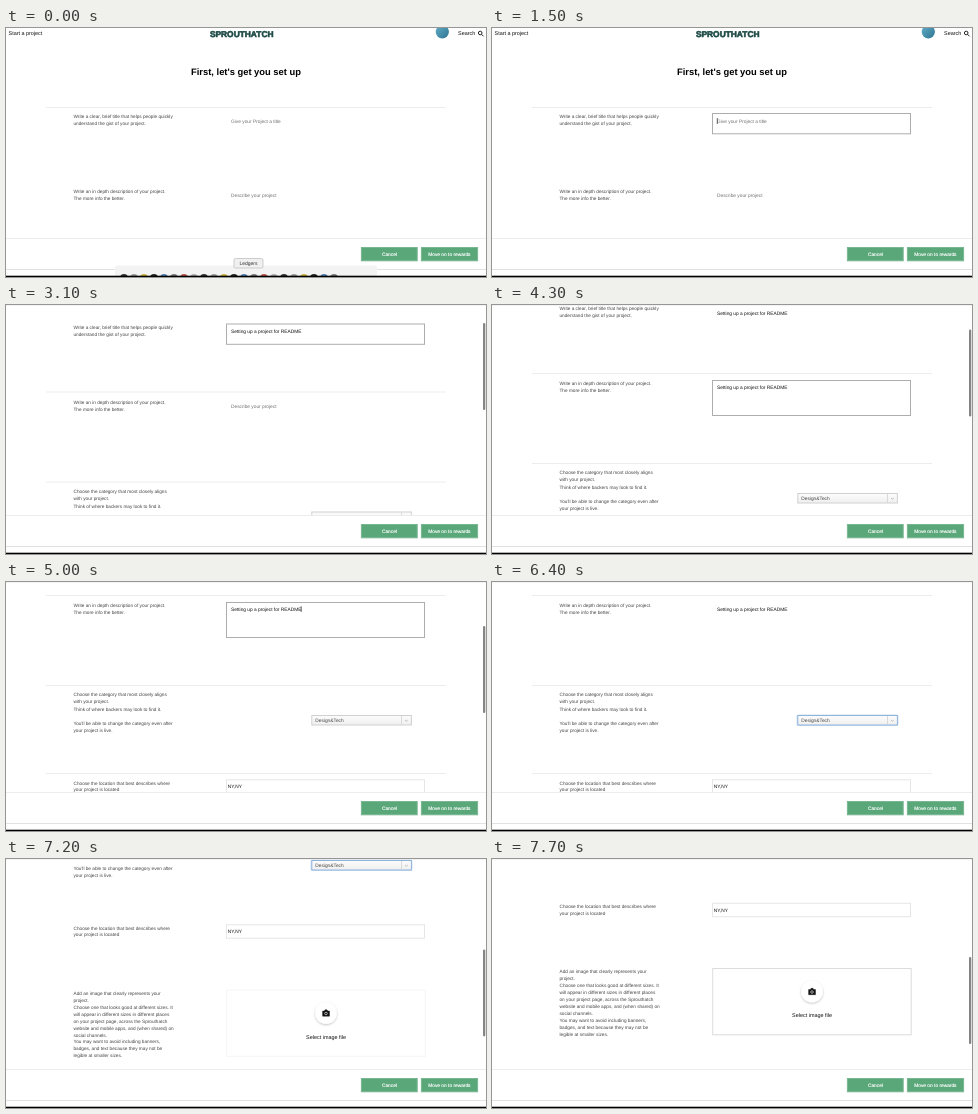
These frames come from a looping animation (480x249 px, 8 s). An HTML page:

```html
<!DOCTYPE html>
<html lang="en">
<head>
<meta charset="utf-8">
<title>Project setup form</title>
<style>
  html, body { margin: 0; width: 100%; height: 100%; overflow: hidden; background: #fff; }
  svg { display: block; width: 480px; height: 249px; }
  text { font-family: "Liberation Sans", Arial, sans-serif; font-size: 4.82px; fill: #111; text-rendering: geometricPrecision; }
  .note { font-size: 4.72px; fill: #444; }
  .hint { fill: #707070; }
  .nav { font-size: 5.45px; }
  .mid { text-anchor: middle; }
  .box { fill: none; stroke: #adadad; }
  .rule { stroke: #ededed; }
  .button rect { fill: #5aa779; stroke: #79b692; }
  .button text { fill: #fff; stroke: #fff; stroke-width: .15; }
</style>
</head>
<body>
<svg viewBox="0 0 480 249">
  <defs>
    <linearGradient id="avatar" x2="1" y2="1">
      <stop stop-color="#62aecb"/><stop offset="1" stop-color="#2f7590"/>
    </linearGradient>
    <linearGradient id="face" x2="0" y2="1">
      <stop stop-color="#fcfcfc"/><stop offset="1" stop-color="#efefef"/>
    </linearGradient>
    <filter id="shadow" x="-50%" y="-50%" width="200%" height="200%">
      <feDropShadow dx="0" dy="1" stdDeviation="1" flood-opacity=".25"/>
    </filter>
  </defs>

  <g id="page">
    <text class="nav" x="2.5" y="7">Start a project</text>
    <text class="mid" x="235.7" y="8.6" style="font-size:8.4px;font-weight:bold;fill:#1d4a46;stroke:#1d4a46;stroke-width:.6;stroke-linejoin:round">SPROUTHATCH</text>
    <circle cx="436.3" cy="3.8" r="6.6" fill="url(#avatar)"/>
    <text class="nav" x="452" y="7">Search</text>
    <g fill="none" stroke="#222"><circle cx="474.2" cy="5" r="1.8"/><path d="M475.5 6.3l2 2"/></g>
    <text class="mid" x="240" y="47.3" style="font-size:9.37px;font-weight:bold;fill:#000">First, let's get you set up</text>

    <g id="rules"></g>
    <g id="notes"></g>

    <rect id="titleBox" class="box" x="220.5" y="85.5" width="198" height="20.3"/>
    <text id="titleText" x="225" y="94.5"></text>
    <path id="titleCaret" d="M225.3 90v6" stroke="#222" stroke-width=".7"/>

    <rect id="aboutBox" class="box" x="220.5" y="160.5" width="198" height="35"/>
    <text id="aboutText" x="225" y="169.2"></text>
    <path id="aboutCaret" d="M295.2 164.3v5.7" stroke="#222" stroke-width=".7"/>

    <rect id="glow" x="305.5" y="273.5" width="100" height="9.5" rx="1" fill="none" stroke="#cfe1f4" stroke-width="2"/>
    <rect id="select" x="305.8" y="273.5" width="99.6" height="9.5" fill="url(#face)"/>
    <path d="M395.5 274v9" stroke="#d2d2d2" stroke-width=".8"/>
    <path d="M399 278l1.4 1.2 1.4-1.2" fill="none" stroke="#999" stroke-width=".6"/>
    <text x="309.3" y="280" fill="#444" style="fill:#444">Design&amp;Tech</text>

    <rect class="box" x="220.5" y="337.8" width="198" height="13.4" style="stroke:#e6e6e6"/>
    <text x="221.8" y="346.4">NY,NY</text>

    <rect id="drop" class="box" x="220.7" y="403" width="198.5" height="66.3"/>
    <circle cx="320" cy="426" r="10.8" fill="#fff" filter="url(#shadow)"/>
    <path d="M316.6 424h1.8l.7-1.2h1.9l.7 1.2h1.8v5.2h-6.9z" fill="#111" stroke="#111" stroke-width=".4" stroke-linejoin="round"/>
    <circle cx="320" cy="426.5" r="1.3" fill="none" stroke="#fff" stroke-width=".6"/>
    <text class="nav mid" x="320" y="451.5">Select image file</text>
  </g>

  <path id="topEdge" d="M0 .3H480" stroke="#e6e6e6" stroke-width=".6"/>
  <rect id="thumb" x="477" width="2.3" height="87" rx="1.1" fill="#858585"/>

  <rect y="210" width="480" height="39" fill="#fff"/>
  <path class="rule" d="M0 210.5H480"/>
  <path d="M0 241.5H480" stroke="#e2e2e2"/>
  <g class="button">
    <rect x="355.4" y="219.5" width="55.8" height="13.3"/>
    <text class="mid" x="383.4" y="227.8">Cancel</text>
    <rect x="415.4" y="219.5" width="56.2" height="13.3"/>
    <text class="mid" x="443.4" y="227.8">Move on to rewards</text>
  </g>

  <g id="dock"><rect x="109" y="237.5" width="262" height="16" rx="2" fill="#f3f3f3"/></g>
  <g id="tip">
    <rect x="228" y="230.5" width="29" height="9.5" rx="1.5" fill="#f0f0f0" stroke="#bbb" stroke-width=".7"/>
    <text class="mid" x="242.5" y="237" style="font-size:5px;fill:#333">Ledgers</text>
  </g>
  <rect y="247.7" width="480" height="1.3" fill="#000"/>
</svg>

<script>
const $ = id => document.getElementById(id);
const LOOP = 8000, TICK = 100;

function add(parent, tag, attrs, text = '') {
  const el = document.createElementNS('http://www.w3.org/2000/svg', tag);
  for (const key in attrs) el.setAttribute(key, attrs[key]);
  el.textContent = text;
  return parent.appendChild(el);
}

// Help text: top line centre, then lines; an empty line leaves a gap
const notes = [
  [88.7, 'Write a clear, brief title that helps people quickly', 'understand the gist of your project.'],
  [163.4, 'Write an in depth description of your project.', 'The more info the better.'],
  [252.6, 'Choose the category that most closely aligns', 'with your project.'],
  [267.5, 'Think of where backers may look to find it.', '',
    "You'll be able to change the category even after", 'your project is live.'],
  [340.8, 'Choose the location that best describes where', 'your project is located'],
  [406, 'Add an image that clearly represents your', 'project.',
    'Choose one that looks good at different sizes. It', 'will appear in different sizes in different places',
    'on your project page, across the Sprouthatch', 'website and mobile apps, and (when shared) on',
    'social channels.', 'You may want to avoid including banners,',
    'badges, and text because they may not be', 'legible at smaller sizes.']
];
for (const [top, ...lines] of notes)
  lines.forEach((line, i) => add($('notes'), 'text', { class: 'note', x: 67.5, y: top + 1.7 + i * 6.97 }, line));

// Section rules: y, shown from, shown until
const rules = [[79.5, 0, 2900], [153.5, 2800, 6600], [243.5, 2800, 6600], [331.5, 4300, 7100], [397.3, 6500, 7100]]
  .map(([y, from, to]) => ({ from, to, el: add($('rules'), 'path', { class: 'rule', d: `M40 ${y}H440` }) }));

const iconColors = ['#333', '#777', '#c9b13c', '#aaa', '#4d7fae', '#999', '#b5564a', '#222'];
for (let i = 0; i < 22; i++)
  add($('dock'), 'circle', { cx: 118 + i * 10, cy: 250, r: 4, fill: iconColors[i * 5 % 8] });

// Linear interpolation through [time, value] pairs
function track(keys, t) {
  const next = keys.findIndex(k => k[0] > t);
  if (next < 0) return keys.at(-1)[1];
  if (!next) return keys[0][1];
  const [t0, a] = keys[next - 1], [t1, b] = keys[next];
  return a + (b - a) * (t - t0) / (t1 - t0);
}

const scrollKeys = [
  [2700, 0], [2800, 6], [2900, 30], [3000, 55], [3100, 66.5], [3400, 67.3],
  [4200, 67.3], [4300, 85], [4400, 115], [4500, 134], [4600, 140],
  [6400, 140], [6500, 165], [6600, 198], [6800, 198], [6900, 203],
  [7000, 222], [7100, 248], [7200, 272], [7300, 286], [7400, 292], [7500, 293.5]
];
const thumbKeys = [[2700, 0], [2800, 1], [3700, 1], [4000, 0], [4200, 0], [4300, 1], [5100, 1], [5400, 0], [6400, 0], [6500, 1]];
const titleKeys = [[1300, 0], [1500, 1], [3500, 1], [3600, 0]];
const aboutKeys = [[4200, 0], [4300, 1], [5100, 1], [5300, 0]];

const fade = (id, value) => $(id).style.opacity = +value;
const between = (t, a, b) => t >= a && t < b;

function fill(id, typed, hint) {
  $(id).textContent = typed ? 'Setting up a project for README' : hint;
  $(id).setAttribute('class', typed ? '' : 'hint');
}

function draw(t) {
  const scroll = track(scrollKeys, t);
  $('page').setAttribute('transform', `translate(0 ${-scroll})`);
  $('thumb').setAttribute('y', scroll * .352 - 5.3);
  fade('thumb', track(thumbKeys, t));
  fade('topEdge', scroll > 0);
  for (const r of rules) r.el.style.opacity = +between(t, r.from, r.to);

  fade('tip', t < 200 ? 1 : t < 400 ? .5 : 0);
  fade('dock', t < 500);
  $('dock').setAttribute('transform', `translate(0 ${t < 400 ? 0 : 6})`);

  fade('titleBox', track(titleKeys, t));
  fade('titleCaret', between(t, 1500, 2000));
  fill('titleText', t >= 2300, 'Give your Project a title');

  fade('aboutBox', track(aboutKeys, t));
  fade('aboutCaret', between(t, 5000, 5200));
  fill('aboutText', t >= 3800, 'Describe your project');

  const chosen = t >= 5200;
  fade('glow', chosen);
  $('select').setAttribute('stroke', chosen ? '#8fb4dc' : '#d0d0d0');
  $('drop').style.stroke = t < 7700 ? '#f5f5f5' : '#dcdcdc';
}

const start = performance.now();
function tick() {
  const t = (performance.now() - start) % LOOP;
  draw(Math.floor(t / TICK) * TICK);
  requestAnimationFrame(tick);
}
tick();
</script>
</body>
</html>
```
